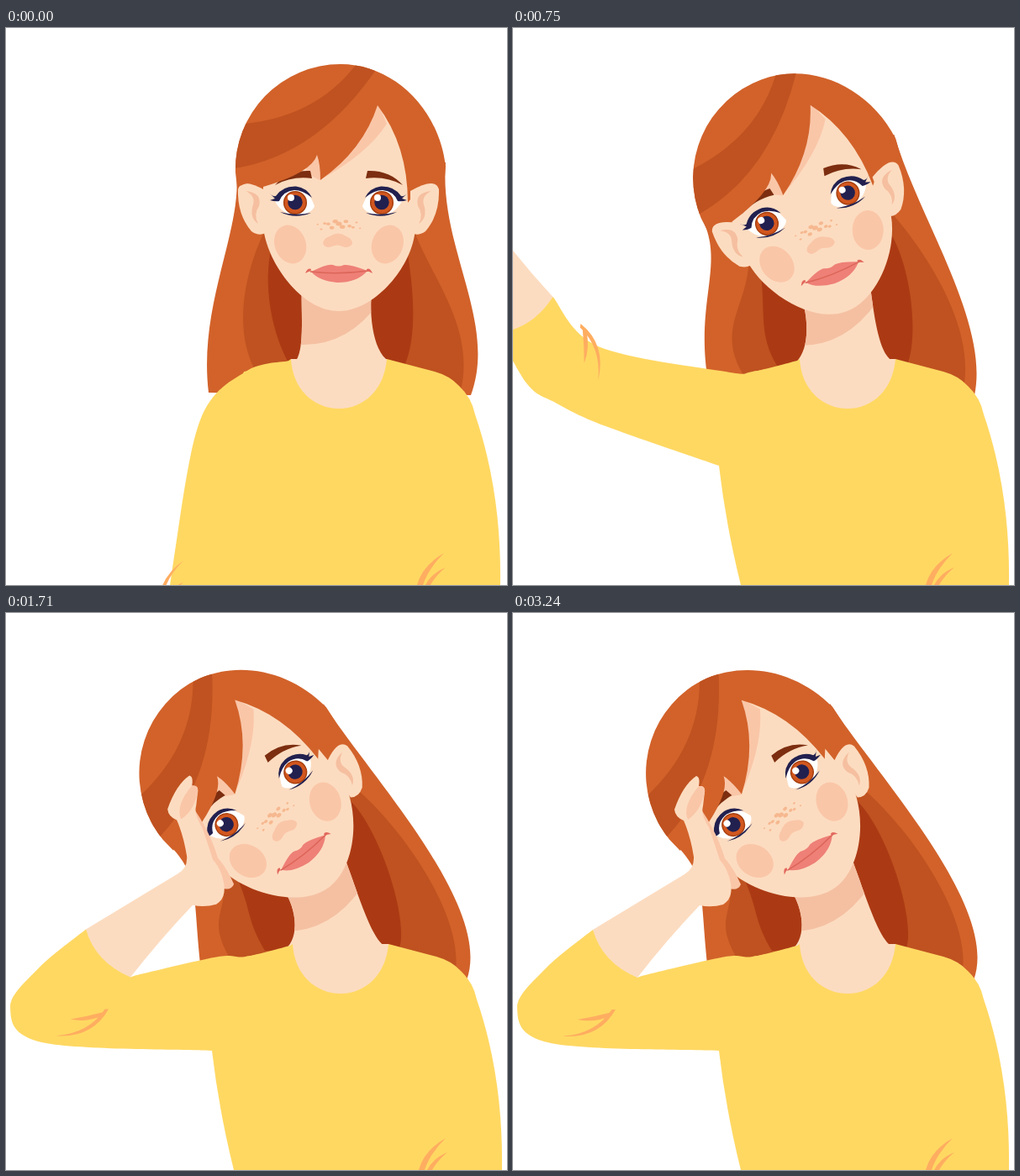
Recreate the animation shown at these times as an HTML page. Size 596 by 663 pixels, loop 4110 ms.

```html
<!DOCTYPE html>
<html lang="en">
<head>
<meta charset="utf-8">
<title>Resting her head</title>
<style>
html, body { margin: 0; width: 100%; height: 100%; overflow: hidden; background: #fff; }
svg { display: block; width: 100vw; height: 100vh; }
.skin { fill: #fcdcc0; }
.blush { fill: #fac6a8; }
.hair { fill: #d2622a; }
.dark { fill: #bf5220; }
.deep { fill: #ab3a14; }
.shirt { fill: #ffd862; }
.fold { fill: #ffad60; }
.navy { fill: #22204f; }
.brow { fill: #7d2e10; }
</style>
</head>
<body>
<svg viewBox="0 0 596 663">
  <defs>
    <g id="ear">
      <path class="skin" d="M310 194Q280 177 276 192Q275 222 292 242Q302 249 310 243Z"/>
      <path fill="#f5bfa0" d="M285 194Q305 196 301 212Q294 222 300 233Q289 226 294 210Q297 200 285 194Z"/>
    </g>
    <g id="eye">
      <path fill="#fff" d="M320 206Q328 190 346 190Q360 192 367 212Q364 221 346 223Q328 222 320 206Z"/>
      <circle cx="344" cy="208" r="13.3" fill="#d2571f" stroke="#a8400f" stroke-width="1.5"/>
      <circle class="navy" cx="344" cy="207.5" r="8.7"/>
      <path class="navy" d="M313 196Q317 201 321 200Q329 188 345 188.500Q358 190 364 202Q353 193 343 193Q330 194 325 206Q321 207 314 205L320 203Z"/>
      <path class="navy" d="M326 219Q344 224 363 220Q344 228 326 219Z"/>
    </g>
    <g id="side">
      <ellipse class="blush" cx="338" cy="257.500" rx="18.500" ry="23.500" transform="rotate(-20 338 257)"/>
      <path class="brow" d="M320 187Q336 169 362 170L364 179Q340 176 320 187Z"/>
      <path fill="#e2685c" d="M356 292Q359 285 363 287Q363 290 360 290Z"/>
    </g>
    <path id="cap" d="M273 172A125 125 0 0 1 398 43C460 43 515 95 523 165L521 190Q500 178 478 208Q478 140 442 92Q425 145 374 181Q374 162 370 151Q364 172 306 189Q290 180 275 190Z"/>
    <clipPath id="inCap"><use href="#cap"/></clipPath>
    <clipPath id="inNeck"><use href="#neck"/></clipPath>
  </defs>

  <path id="backHair" class="hair"/>
  <path id="darkHair" class="dark"/>
  <path id="deepHair" class="deep"/>
  <path id="neck" class="skin"/>
  <g clip-path="url(#inNeck)">
    <path id="neckShade" fill="#f5c0a2" d="M310 280V377H352Q408 378 445 325L470 280Z"/>
  </g>
  <g id="torso">
    <path class="shirt" d="M341 394Q332 402 285 409L262 470L245 521Q253 590 271 663H590C591 600 584 530 560 460Q556 440 541 426Q530 414 512 409L455 394Z"/>
    <path class="skin" d="M341 394C343 430 368 453 398 453C428 453 452 430 455 394Z"/>
    <path class="fold" d="M491 663Q497 640 523 625Q504 644 498 663ZM501 663Q508 649 525 642Q513 652 507 663Z"/>
  </g>

  <g id="head">
    <use id="earL" href="#ear"/>
    <path class="skin" d="M306 175V235C308 275 350 337 396 337C440 337 487 280 487 235L484 150C484 100 450 70 400 80L330 120Z"/>
    <path class="blush" d="M442 88L453 114Q430 150 373 181L356 172L366 140Z"/>
    <g id="features">
      <use href="#side"/>
      <use href="#side" transform="matrix(-1 0 0 1 792 0)"/>
      <path class="blush" d="M377 256Q378 250 385 248Q395 241 405 248Q412 251 412 257Q407 263 400 260Q394 257 388 260Q379 263 377 256Z"/>
      <g id="freckles" fill="#f6b890"></g>
      <path fill="#ee8077" d="M363 290Q383 280 389 282Q396 285 402 282Q410 281 430 289Q418 303 394 303Q372 301 363 290Z"/>
      <path fill="none" stroke="#dc6558" stroke-width="1.500" d="M362 290Q394 294 431 289"/>
      <g id="eyes">
        <use href="#eye"/>
        <use href="#eye" transform="matrix(-1 0 0 1 791 0)"/>
        <circle cx="339" cy="202" r="4" fill="#fff"/>
        <circle cx="442" cy="202" r="4" fill="#fff"/>
      </g>
    </g>
    <use class="hair" href="#cap"/>
    <path class="dark" clip-path="url(#inCap)" d="M270 115Q368 110 419 40L444 44Q370 155 265 168Z"/>
    <use id="earR" href="#ear"/>
  </g>

  <path id="sleeve" class="shirt"/>
  <g id="forearm">
    <path class="blush" d="M224 234Q243 262 252 292Q262 303 271 323Q268 331 257 328Q248 300 230 270Z"/>
    <path class="skin" d="M95 377L204 311Q216 304 215 290Q211 265 203 247Q193 243 192 234Q202 205 218 194Q223 195 221 206Q229 205 228 213L226 230Q223 240 233 255Q240 275 246 294Q256 305 259 322Q262 340 250 347Q236 351 222 348Q182 390 148 434Q106 416 95 377Z"/>
    <path class="blush" d="M221 206Q229 205 228 214Q223 236 208 246Q201 230 221 206Z"/>
  </g>
  <path id="crease" class="fold" d="M0 0Q33 -22 70 0Q34 -15 4 2ZM8 -4Q30 -3 46 10Q27 4 8 0Z"/>
</svg>
<script>
const LOOP = 4110, STEP = 30;
const $ = id => document.getElementById(id);
const put = (id, name, value) => $(id).setAttribute(name, value);
const mix = (a, b, k) => a + (b - a) * k;
const smooth = (t, from, to) => {
  const u = Math.min(1, Math.max(0, (t - from) / (to - from)));
  return u * u * (3 - 2 * u);
};
const rotate = ([x, y], [cx, cy], deg) => {
  const r = deg * Math.PI / 180, c = Math.cos(r), s = Math.sin(r);
  return [cx + (x - cx) * c - (y - cy) * s, cy + (x - cx) * s + (y - cy) * c];
};

// Catmull-Rom curve through the points
function spline(pts) {
  const at = i => pts[Math.min(pts.length - 1, Math.max(0, i))];
  const ctrl = (i, dir) => at(i).map((v, k) => v + dir * (at(i + 1)[k] - at(i - 1)[k]) / 6);
  let d = 'M' + pts[0];
  for (let i = 1; i < pts.length; i++) d += `C${ctrl(i - 1, 1)} ${ctrl(i, -1)} ${pts[i]}`;
  return d;
}

// A strand is a Bezier: root and bend follow the head, hang and end stay at the shoulders
const strand = (root, bend, hang, end, drift, sway = 0) => ({ root, bend, hang, end, drift, sway });
const BANDS = {
  backHair: [strand([273, 165], [285, 235], [228, 325], [241, 434], -8, -10),
             strand([523, 160], [515, 262], [585, 350], [553, 437], -5, -14)],
  darkHair: [strand([306, 245], [285, 290], [268, 360], [299, 412], -32),
             strand([487, 245], [508, 300], [560, 360], [540, 435], -7)],
  deepHair: [strand([316, 260], [305, 305], [316, 365], [338, 402], -30),
             strand([478, 270], [486, 320], [488, 370], [474, 402], -7)],
  neck: [strand([352, 300], [350, 340], [358, 392], [339, 402], -10),
         strand([437, 300], [430, 335], [436, 385], [455, 396], -5)]
};
const EYES = [395.5, 208];

for (let i = -6; i <= 6; i++) {
  const spread = Math.abs(i), r = 3.6 - spread * .4;
  $('freckles').innerHTML +=
    `<ellipse cx="${396 + i * 4.2}" cy="${233 + 4 * Math.sin(i * 2.2) + spread * .5}" rx="${r}" ry="${r * .7}"/>`;
}

function drawHead(t, tilt) {
  const turn = -37.5 * tilt;
  const shift = [-70 * tilt - 20 * tilt ** 2, 16 * tilt];
  const carry = p => rotate(p, EYES, turn).map((v, k) => v + shift[k]);
  const settle = 1 - (1 - tilt) ** 2, swing = Math.sin(Math.PI * tilt);

  for (const [id, sides] of Object.entries(BANDS)) {
    const [left, right] = sides.map(s => {
      const dx = s.drift * settle;
      return [carry(s.root), carry(s.bend), [s.hang[0] + dx + s.sway * swing, s.hang[1]], [s.end[0] + dx, s.end[1]]];
    });
    const [a, b, c, d] = right;
    put(id, 'd', `M${left[0]}C${left.slice(1).join(' ')}L${d}C${c} ${b} ${a}Z`);
  }
  put('neckShade', 'transform', `translate(${-22 * tilt} ${2 * tilt})`);
  put('head', 'transform', `translate(${shift}) rotate(${turn} ${EYES})`);
  put('features', 'transform', `translate(0 ${-4 * tilt})`);
  put('earL', 'transform', `translate(${22 * tilt ** 3} 0)`);
  put('earR', 'transform', `matrix(-1 0 0 1 791 ${25 * tilt ** 3})`);

  const blink = t > 3000 && t < 3240 ? Math.sin(Math.PI * (t - 3000) / 240) : 0;
  put('eyes', 'transform', `translate(0 212) scale(1 ${1 - .9 * blink}) translate(0 -212)`);
}

const STRETCHED = { swing: 0, bend: 12, elbow: [18, 410], crease: [82, 413], tip: [66, 501], base: [81, 499] };
const HANGING = { ...STRETCHED, swing: -78 };
const RAISED = { swing: 0, bend: 72, elbow: [80, 352], crease: [101, 379], tip: [52, 447], base: [110, 474] };
const TOUCHING = { swing: 0, bend: 155, elbow: [130, 432], crease: [165, 404], tip: [10, 420], base: [45, 470] };
const SUNK = { swing: 0, bend: 153, elbow: [122, 472], crease: [165, 429], tip: [5, 470], base: [45, 512] };
const POSES = [HANGING, STRETCHED, RAISED, TOUCHING, SUNK];
const SHOULDER = [278, 452];

// Share of each pose: a smooth run through the first four, then towards the last
function poseWeights(t, sink) {
  const p = 3 * Math.min(1, Math.max(0, (t - 20) / 1090));
  const i = Math.min(2, Math.floor(p)), u = p - i, w = [0, 0, 0, 0, 0];
  const tangent = (j, k) => {
    if (j % 3) { w[j + 1] += k / 2; w[j - 1] -= k / 2; }
  };
  w[i] = 1 - smooth(u, 0, 1);
  w[i + 1] = smooth(u, 0, 1);
  tangent(i, u * (1 - u) ** 2);
  tangent(i + 1, -u * u * (1 - u));
  return w.map((v, j) => mix(v, j === 4 ? 1 : 0, sink));
}

function drawArm(t, sink) {
  const weights = poseWeights(t, sink);
  const sum = get => POSES.reduce((total, pose, i) => total + weights[i] * get(pose), 0);
  const swing = sum(p => p.swing), bend = sum(p => p.bend) + swing;
  const swung = p => rotate(p, SHOULDER, swing);
  const joint = name => swung([sum(p => p[name][0]), sum(p => p[name][1])]);
  const elbow = joint('elbow');
  const onForearm = (x, y) => rotate([x - 122 + elbow[0], y - 472 + elbow[1]], elbow, bend - 153);

  const top = [[338, 396], [285, 409], swung([253, 409]), joint('crease'), onForearm(148, 434)];
  const under = [onForearm(95, 377), onForearm(40, 422), joint('tip'), joint('base'), [245, 521]];
  put('sleeve', 'd', spline(top) + 'L' + spline(under).slice(1) + 'L290 470Z');
  put('forearm', 'transform', `translate(${elbow}) rotate(${bend - 153}) translate(-122 -472)`);
  put('crease', 'transform', `translate(${elbow}) rotate(${bend})`);
}

function draw(t) {
  const sink = smooth(t, 1095, 1480) - smooth(t, 1690, 2025) + smooth(t, 2195, 2405);
  put('torso', 'transform', `translate(${-2 * (1 - smooth(t, 0, 390))} 0)`);
  drawHead(t, .73 * smooth(t, 0, 1110) + .27 * sink);
  drawArm(t, sink);
}

const start = performance.now();
function tick() {
  const t = (performance.now() - start) % LOOP;
  draw(Math.floor(t / STEP) * STEP);
  requestAnimationFrame(tick);
}
tick();
</script>
</body>
</html>
```
